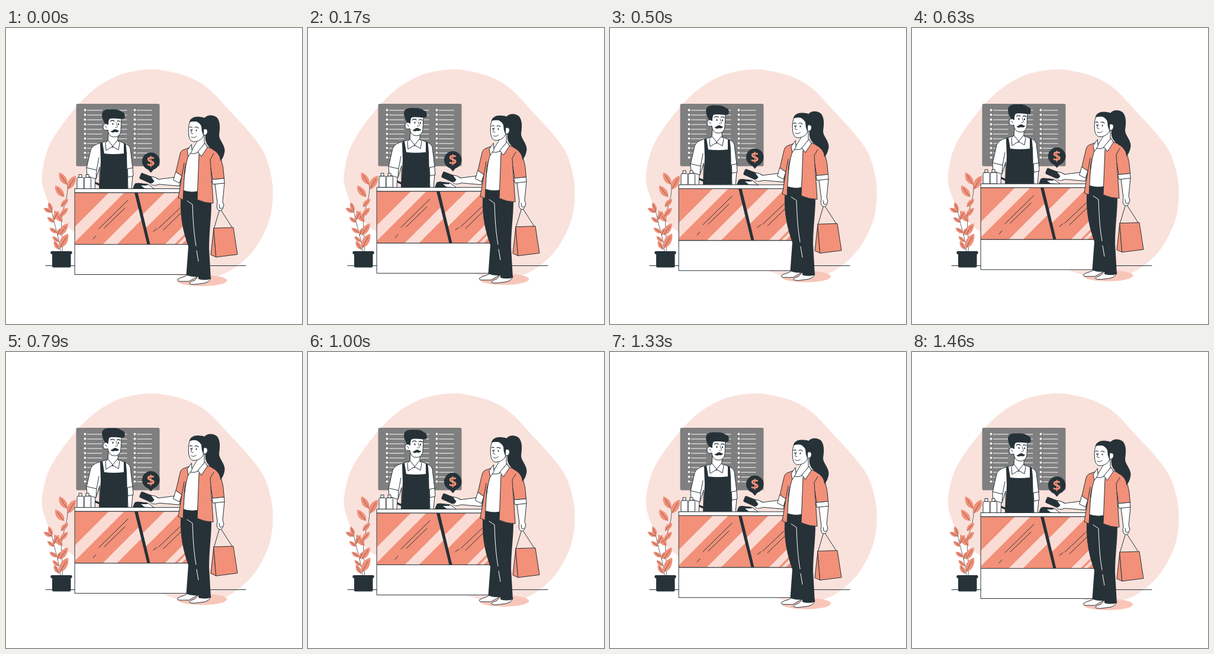
Animation of 500 by 500 pixels, one loop 1500 ms. Source, as an HTML page with a canvas:

```html
<!DOCTYPE html>
<html lang="en">
<head>
<meta charset="utf-8">
<title>Paying at the counter</title>
<style>
  html, body { margin: 0; width: 100%; height: 100%; overflow: hidden; background: #fff; }
  canvas { display: block; width: 500px; height: 500px; }
</style>
</head>
<body>
<canvas id="stage" width="500" height="500"></canvas>
<script>
const ctx = document.getElementById('stage').getContext('2d');
const LOOP = 1500, STEPS = 36, LIFT = 10;
const INK = '#263238', WHITE = '#fff', CORAL = '#f29079';
const BLUSH = '#fae2dc', GLARE = '#fbdcd5', BOARD = '#7f7f7f', SHADOW = '#f8c6b9';

function shape(d, fill, stroke = INK, width = 1) {
  const path = new Path2D(d);
  if (fill) { ctx.fillStyle = fill; ctx.fill(path); }
  if (stroke) { ctx.strokeStyle = stroke; ctx.lineWidth = width; ctx.stroke(path); }
}
const flat = (d, fill) => shape(d, fill, null);
const line = (d, color = INK, width = 1) => shape(d, null, color, width);

function oval(x, y, rx, ry, fill) {
  ctx.beginPath();
  ctx.ellipse(x, y, rx, ry, 0, 0, Math.PI * 2);
  ctx.fillStyle = fill;
  ctx.fill();
}

// Closed smooth curve through a few points
function smooth(points) {
  const n = points.length, at = i => points[(i + n) % n];
  let d = `M${at(0)}`;
  for (let i = 0; i < n; i++) {
    const [a, b, c, e] = [at(i - 1), at(i), at(i + 1), at(i + 2)];
    d += `C${b[0] + (c[0] - a[0]) / 6} ${b[1] + (c[1] - a[1]) / 6} ` +
         `${c[0] - (e[0] - b[0]) / 6} ${c[1] - (e[1] - b[1]) / 6} ${c}`;
  }
  return d + 'Z';
}

const blob = smooth([
  [240, 70], [278, 74], [314, 85], [345, 105], [377, 139], [411, 176], [436, 211], [449, 255], [450, 297],
  [441, 335], [418, 376], [385, 406], [350, 421], [310, 422], [265, 409], [220, 385],
  [165, 362], [117, 345], [82, 313], [65, 277], [61, 246], [73, 199], [105, 150], [145, 107], [190, 80]
]);

function drawBoard() {
  ctx.beginPath();
  ctx.roundRect(118.5, 128, 141, 105.5, 2.5);
  ctx.fillStyle = BOARD;
  ctx.fill();
  for (let row = 0; row < 11; row++) {
    const y = 138.6 + row * 8.02;
    for (const x of [133.5, 175.5, 217.5]) {
      flat(`M${x - 2.3} ${y}l2.3 -2.3 2.3 2.3 -2.3 2.3Z`, WHITE);
      line(`M${x + 4} ${y + 0.4}h24.5`, WHITE);
    }
  }
}

// Leaf from its base, pointing along an angle in degrees
function leaf(x, y, angle, length) {
  ctx.save();
  ctx.translate(x, y);
  ctx.rotate(angle * Math.PI / 180);
  const l = length, w = length * 0.33;
  flat(`M0 0C${l * 0.2} ${-w} ${l * 0.7} ${-w} ${l} 0C${l * 0.65} ${w * 0.8} ${l * 0.2} ${w * 0.8} 0 0Z`, CORAL);
  line(`M0 0Q${l * 0.4} -1 ${l * 0.75} 0`, INK, 0.5);
  ctx.restore();
}

function drawPlant() {
  line('M95 378C97 355 92 340 94 322C96 302 104 290 104 270C103 260 99 254 96 249', INK, 0.7);
  line('M92 378C90 355 84 340 80 322C78 312 76 304 73 298', INK, 0.7);
  [[103, 264, -122, 24], [105, 272, -60, 26], [98, 285, -128, 24], [93, 302, -47, 18],
   [95, 327, -126, 23], [92, 318, -48, 19], [91, 350, -55, 24], [92, 371, -61, 27]].forEach(l => leaf(...l));
  [[78, 309, -112, 16], [78, 311, -155, 16], [81, 324, -62, 17], [82, 328, -145, 15],
   [87, 346, -148, 16], [87, 350, -64, 14], [89, 361, -138, 14], [90, 374, -122, 17]].forEach(l => leaf(...l));
  flat('M78 380H109.5V402Q109.5 404.5 107 404.5H80.5Q78 404.5 78 402Z', INK);
  flat('M77 377H110Q111.7 377 111.7 379.5T110 382H77Q75.3 382 75.3 379.5T77 377Z', INK);
}

function drawCashier() {
  // Arms and shirt
  shape('M138 250L138 273H150L151 250ZM204 249L206 273H212L214 249Z', WHITE);
  shape('M170 191L157 195Q146 198 143 206L136 237L137 250L152 255L158 235V273H206L205 238L206 252L215 250L214 237L210 204Q208 197 200 195L191 191Z', WHITE);
  line('M136 236L153 240L152 254M153 240L157 219M205 238L215 236');
  // Apron
  flat('M159 195L163 193.5L166 212Q181 214 199 212L199 194L202.5 195.5L204 212L205.5 272H157L160 226Z', INK);
  flat('M151 260L161 264V268L150 263Z', INK);
  // Neck and collar
  shape('M173 178L172 192L180 202L189 192V180Z', WHITE);
  shape('M172 190L168 194L169 207L180 200ZM188 190L180 200L190 206L192 194Z', WHITE);
  // Head
  shape('M172 163C169 160 164 162 164 167C164 172 168 174 172 172C173 179 176 184 182 184C190 185 194 179 194 172L195 152H172Z', WHITE);
  flat('M167.5 162C163 155 160 145 164 141C167 137 174 137 180 137.5C188 137 193 139 196 142C201 142 202 150 199.5 153C193 155 183 151 176 153C172 155 174 162 172 164Q170 161 167.5 162Z', INK);
  line('M176.5 157.5Q180 155 183 157.5M187.5 157.5Q190 156 193 158', INK, 1.3);
  oval(180.5, 162, 1.1, 1.6, INK);
  oval(190, 162.5, 1.1, 1.6, INK);
  line('M186 160L188.5 167Q187 169 184.5 168M167 166Q170 165 170 169', INK, 0.8);
  flat('M176.5 174.5C180 174 181.5 171 184.5 171C187 171 188 173.5 191.5 173.5C189 176.5 186.5 176.8 184 175.6C181 177.3 178.5 176.8 176.5 174.5Z', INK);
}

// Diagonal glare on the glass, bounded by two values of x + y
function glare(from, to) {
  flat(`M${from - 278} 278H${to - 278}L${to - 366} 366H${from - 366}Z`, GLARE);
}

function drawGlass() {
  const pane = 'M116.5 278H309V365.5H116.5Z';
  const leftPane = 'M116.5 278H219L241 365.5H116.5Z', rightPane = 'M219 278H309V365.5H241Z';
  flat(pane, CORAL);
  for (const [clip, bands] of [
    [leftPane, [[452, 478], [529, 553]]],
    [rightPane, [[546, 574], [634, 650], [655, 662]]]
  ]) {
    ctx.save();
    ctx.clip(new Path2D(clip));
    bands.forEach(band => glare(...band));
    ctx.restore();
  }
  flat('M217 278H222.5L243.5 365.5H238.5Z', INK);
  line('M206 291L157 339M201 304L166 338M152 351L147 356.5M294 304L258 338M296 312L266 341M255 339L249 343.5');
  shape(pane, null);
}

function drawCounter() {
  for (const x of [120, 132]) {
    shape(`M${x + 3.5} 247.5h4.5v5h-4.5Z`, WHITE);
    shape(`M${x + 2} 252.5h7.5q2 0 2 2v17h-11.5v-17q0 -2 2 -2Z`, WHITE);
  }
  shape('M116.5 365.5H309V416.5H116.5Z', WHITE);
  drawGlass();
  shape('M116.5 271.5H305V278H116.5Z', WHITE);
  // Card reader
  shape('M216 270L222 262L240 264L250 271.5Z', WHITE);
  flat('M214 271.5L217 264Q218 261.5 222 262L238 264L240 266L228 266L235 271.5Z', INK);
}

function drawBag() {
  line('M361 306L351.5 338M362 306L382 337');
  shape('M351 338L346 383L355 387Z', CORAL);
  shape('M351 338L384 337L391 382.5L355 387Z', CORAL);
}

function drawCustomer() {
  // Shoes
  shape('M307 417L301 420Q293 422 289.5 425Q289 428 295 428H309L325 419Z', WHITE);
  shape('M326 418L319 426Q312 428 309.5 431Q311 433.5 320 433L335 431Q344 429 346 422Z', WHITE);
  // Trousers
  flat('M299 273L295 291C294 320 299 344 308 369L304.5 417Q313 421 325 420L325 424Q335 427 346 424L343 372C343 344 347 320 347 294L325 276Z', INK);
  line('M306 292L315 298C316 325 317 345 321 368M322 376L325 394', WHITE);
  // Extended arm, card and hand
  shape('M286 252L258 255.5Q251 252 245 251L241 257L246 265Q253 267 259 264L293 267L296 255Z', WHITE);
  flat('M230.5 245L250 252.5Q252 253.5 251.5 256L248.5 262Q247 264 244.5 263L226.5 255Q224.5 254 225.5 252L228 246Q229 244.3 230.5 245Z', INK);
  flat('M245 251Q252 251 256 256L254 264Q248 267 243 262Q249 263 250 258Z', WHITE);
  line('M245 251Q252 251 258 255.5M243 262Q249 263 250 258');
  // Top and jacket
  shape('M312 203L306 217L298 274Q312 279 324 276L328 207Z', WHITE);
  shape('M310 202L299 206Q295 208 294 213L287 243L297 250L291 287L299 290L302 237L309 212Z', CORAL);
  line('M297 250L301 228');
  shape('M287 243L297 250L293 262L283 257Z', WHITE);
  shape('M335 199L352 205Q360 208 362 216Q368 235 368.5 254L349 256L346 237L350 296Q336 296 323 290L326 214Z', CORAL);
  line('M346 237L345 222L351 212');
  // Resting arm
  shape('M353 263L357 295Q355 303 358 307Q363 311 366 305L368 299L366 293L369 262Z', WHITE);
  line('M360 298L361 304Q363 306 365 304');
  shape('M348 256L368.5 254L369 262L350 264Z', WHITE);
  // Ponytail sits behind the head
  flat('M334 155C336 146 351 145 357 152C363 160 361 173 360 181C360 190 370 197 369.5 208Q368 219 362 225Q362 215 353 208C343 202 335 195 337 181Z', INK);
  // Neck and collar
  flat('M322 188L313 206L318 213L326 210L336 196V176Z', WHITE);
  line('M323 191L313 208M335 181V196L324 210M310 212Q318 213.5 326 210');
  shape('M313 197L306 207L308 217L314 208ZM336 195L324 209L330 217L340 202Z', WHITE);
  // Head
  shape('M311 158C308 164 308 171 308.5 179C309 188 313 193 319 192C327 191 332 187 334 181C341 183 343 173 337 171L333 157Z', WHITE);
  flat('M309.5 160C311 151 321 148.5 330 150.5Q337 151 342 157L340 174Q337 169 334 172L333 181Q330 174 330 166C326 158 318 155 309.5 160Z', INK);
  shape('M334 171C340 168 342 175 339 179Q337 182 334 181Z', WHITE);
  line('M310 168Q312 166 314.5 168M319 168Q322 166 325 169', INK, 1.1);
  oval(312.5, 172.5, 1, 1.5, INK);
  oval(321.5, 173, 1, 1.5, INK);
  line('M315 171L312.5 177Q313 179 316 178.5M313 184Q317 187 321.5 183', INK, 0.9);
}

function drawBubble() {
  oval(244.7, 225, 14.8, 14.8, INK);
  flat('M238 237L244.8 244.5L251 237Z', INK);
  ctx.fillStyle = CORAL;
  ctx.font = 'bold 24px "Open Sans", "Noto Sans", sans-serif';
  ctx.textAlign = 'center';
  ctx.textBaseline = 'alphabetic';
  ctx.fillText('$', 244.7, 233.7);
}

// Linear rise and fall, sampled 24 times per second
function lift(time) {
  const step = Math.floor((time % LOOP + 4) / LOOP * STEPS) % STEPS;
  const phase = (step + 0.5) / STEPS;
  return LIFT * (1 - Math.abs(1 - 2 * phase)) - LIFT / STEPS;
}

function draw(time) {
  ctx.fillStyle = WHITE;
  ctx.fillRect(0, 0, 500, 500);
  ctx.lineJoin = ctx.lineCap = 'round';
  flat(blob, BLUSH);
  line('M67 401.5H405');
  drawBoard();
  drawPlant();
  ctx.save();
  ctx.translate(0, -lift(time));
  oval(331, 426.5, 42.3, 9.6, SHADOW);
  drawCashier();
  drawCounter();
  drawBag();
  drawCustomer();
  drawBubble();
  ctx.restore();
}

const start = performance.now();
function tick() {
  draw(performance.now() - start);
  requestAnimationFrame(tick);
}
tick();
</script>
</body>
</html>
```
